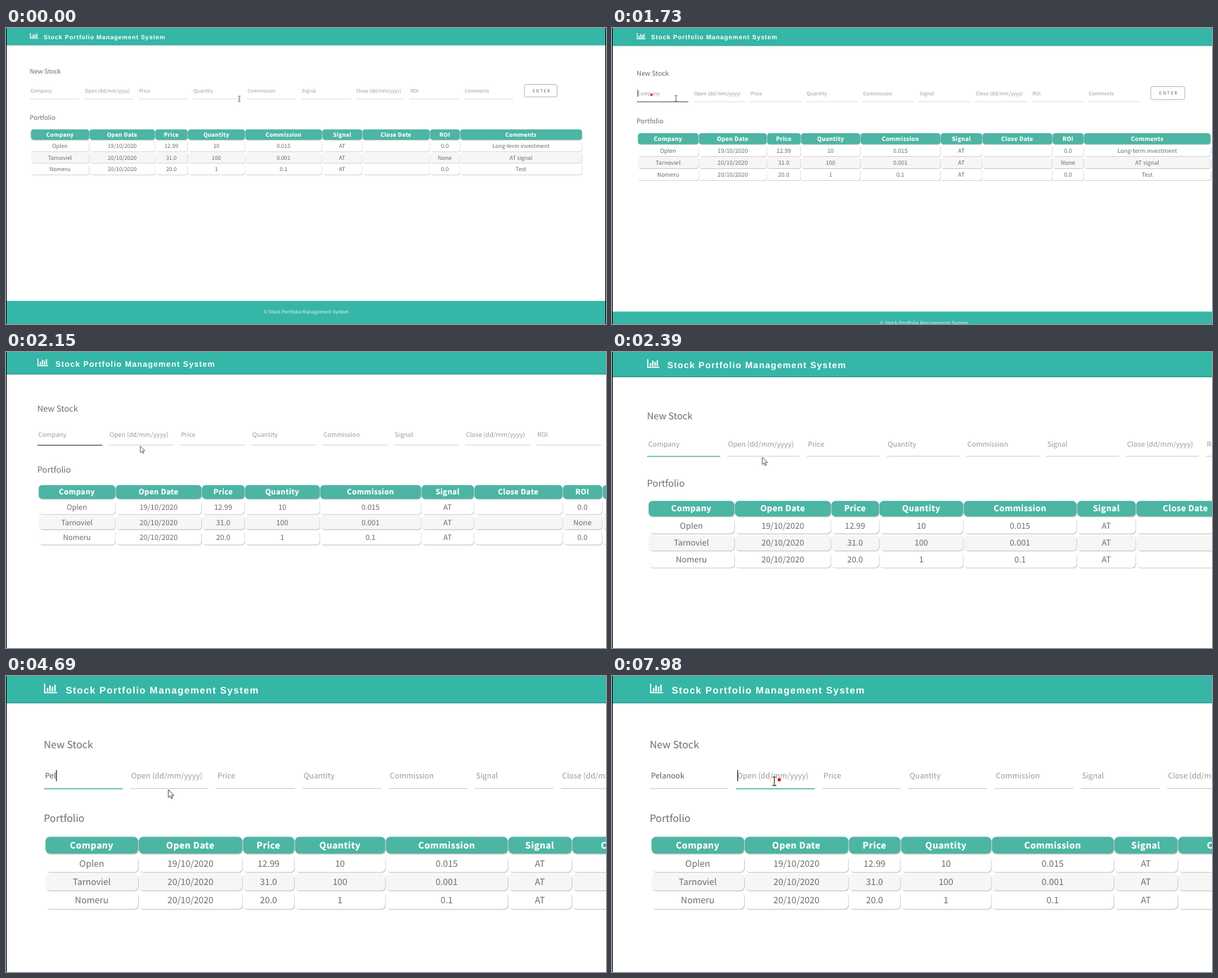
An HTML page for the animation above (8 s loop, 854 by 422 pixels).

```html
<!DOCTYPE html>
<html lang="en">
<head>
<meta charset="utf-8">
<title>Stock Portfolio Management System</title>
<style>
  html, body { margin: 0; width: 100%; height: 100%; overflow: hidden; background: #fff; }
  svg { display: block; width: 854px; height: 422px; }
  text { font-family: "Noto Sans CJK JP", "Noto Sans CJK SC", "Noto Sans", sans-serif;
         font-weight: 300; text-rendering: geometricPrecision; white-space: pre; }
  .brand { font: 700 8.6px "Liberation Sans", Arial, sans-serif; letter-spacing: .74px; fill: #fff; }
  .label { font-size: 9px; fill: #6c6c6c; }
  .hint { font-size: 6.8px; fill: #9a9a9a; }
  .typed { font-size: 6.8px; fill: #5c5c5c; }
  .head { font-size: 7.9px; font-weight: 700; letter-spacing: .31px; fill: #fff; text-anchor: middle;
          stroke: #fff; stroke-width: .15px; }
  .cell { font-size: 7.9px; fill: #6c6c6c; text-anchor: middle; }
  .button { font-size: 6.4px; letter-spacing: 1.2px; fill: #707070; text-anchor: middle; }
  .foot { font-size: 6.8px; fill: #e4f5f2; text-anchor: middle; }
</style>
</head>
<body>
<svg id="stage" viewBox="0 0 854 422" xmlns="http://www.w3.org/2000/svg">
  <g id="page"></g>
  <rect width="1" height="422" fill="#000"/>
</svg>
<script>
const LOOP = 8000;
const page = document.getElementById('page');

function add(tag, attrs, text) {
  const el = document.createElementNS('http://www.w3.org/2000/svg', tag);
  for (const k in attrs) el.setAttribute(k, attrs[k]);
  if (text !== undefined) el.textContent = text;
  page.appendChild(el);
  return el;
}
const box = (x, y, width, height, fill, rx = 0) => add('rect', { x, y, width, height, fill, rx });
const write = (cls, x, y, text) => add('text', { class: cls, x, y }, text);
const show = (el, on) => el.setAttribute('visibility', on ? 'visible' : 'hidden');

// Header and footer
const TEAL = '#35b6a6', GREY = '#cfcfcf', GREEN = '#5bba96';
box(0, 0, 854, 24.4, TEAL);
box(0, 23.8, 854, .6, '#2b8f83');
add('path', { d: 'M34.6 7V14.8H45.8', fill: 'none', stroke: '#fff', 'stroke-width': 1.1 });
[3, 5.4, 4.2, 6].forEach((h, i) => box(36.6 + i * 2.2, 13.8 - h, 1.3, h, '#fff'));
write('brand', 53.5, 15.8, 'Stock Portfolio Management System');
box(0, 389.1, 854, 33, TEAL);
write('foot', 427, 407.2, '© Stock Portfolio Management System');
box(853, 0, 1, 422, '#000');

// Form
write('label', 33.8, 65, 'New Stock');
write('label', 33.8, 130.8, 'Portfolio');
const fields = ['Company', 'Open (dd/mm/yyyy)', 'Price', 'Quantity', 'Commission',
  'Signal', 'Close (dd/mm/yyyy)', 'ROI', 'Comments'].map((name, i) => {
  const x = 34 + i * 77.25;
  return { x, hint: write('hint', x + 1, 92, name), line: box(x, 100.7, 70.5, .7, GREY) };
});
add('rect', { x: 738, y: 80.4, width: 46.4, height: 17.8, rx: 2.2, fill: '#fff', stroke: '#aaa', 'stroke-width': .8 });
write('button', 762.4, 91.8, 'ENTER');

// Table
const widths = [83.6, 93.4, 46.6, 81.5, 109.8, 57.2, 96, 43, 173.8];
const rows = [
  ['Company', 'Open Date', 'Price', 'Quantity', 'Commission', 'Signal', 'Close Date', 'ROI', 'Comments'],
  ['Oplen', '19/10/2020', '12.99', '10', '0.015', 'AT', '', '0.0', 'Long-term investment'],
  ['Tarnoviel', '20/10/2020', '31.0', '100', '0.001', 'AT', '', 'None', 'AT signal'],
  ['Nomeru', '20/10/2020', '20.0', '1', '0.1', 'AT', '', '0.0', 'Test']
];
rows.forEach((row, r) => {
  const y = 144.4 + r * 16.55;
  const fill = r === 0 ? '#4cb5a3' : r % 2 ? '#fff' : '#f6f6f6';
  let x = 35.4;
  row.forEach((text, c) => {
    const w = widths[c] - .6;
    box(x + .6, y + .8, w, 15, '#cbcbcb', 3.8);
    box(x, y, w, 15, fill, 3.8);
    write(r ? 'cell' : 'head', x + w / 2 - .1, y + 10.3, text);
    x += widths[c];
  });
});

// Typed text, caret, click dot, pointer
const typed = write('typed', 35, 92, '');
const caret = box(0, 84.5, .75, 9.9, '#222');
const dot = add('circle', { r: 1.55, fill: '#e01818' });
const beam = add('path', {
  d: 'M-1.8 -3.8H-.5L0 -3.4L.5 -3.8H1.8M0 -3.4V3.4M-1.8 3.8H-.5L0 3.4L.5 3.8H1.8',
  fill: 'none', stroke: '#333', 'stroke-width': .7
});
const arrow = add('path', {
  d: 'M0 0V7L1.6 5.5L2.7 8L3.9 7.5L2.8 5.1H5Z',
  fill: '#fff', stroke: '#333', 'stroke-width': .55, 'stroke-linejoin': 'round'
});

const WORD = 'Pelanook', BLINK = 530, DOT_DELAY = 250;
const FOCUS = [1480, 7640];
// Two bursts of four letters
const keyTime = i => i < 4 ? 4430 + i * 107 : 5680 + (i - 4) * 173;
const resets = [...FOCUS, ...[...WORD].map((_, i) => keyTime(i))];

const clamp = v => Math.max(0, Math.min(1, v));
const mix = (a, b, k) => a + (b - a) * k;

const stops = [[332, 101], [50, 93], [145.5, 102.1], [145.5, 94.5]];
const legs = [
  { start: 230, end: 1460, dip: 26 },
  { start: 1610, end: 1915, dip: 0 },
  { start: 7400, end: 7610, dip: 0 }
];

function pointer(t) {
  const i = Math.max(0, legs.filter(leg => t >= leg.start).length - 1);
  const { start, end, dip } = legs[i];
  const k = clamp((t - start) / (end - start));
  const [a, b] = [stops[i], stops[i + 1]];
  return [mix(a[0], b[0], k), mix(a[1], b[1], k) + dip * Math.sin(Math.PI * k)];
}

function underline(field, color) {
  field.line.setAttribute('fill', color);
  field.line.setAttribute('height', color === GREY ? .7 : 1);
}

function draw(t) {
  const q = Math.floor((t - 20) / 30) * 30 + 20;
  page.setAttribute('transform', `scale(${mix(1, 1.588, clamp((q - 1670) / 900))})`);

  const [x, y] = pointer(q);
  const inField = y < 102;
  [beam, arrow].forEach(el => el.setAttribute('transform', `translate(${x} ${y})`));
  show(beam, inField);
  show(arrow, !inField);

  const text = [...WORD].filter((_, i) => t >= keyTime(i)).join('');
  if (typed.textContent !== text) typed.textContent = text;
  show(fields[0].hint, !text);

  const second = t >= FOCUS[1];
  const since = t - Math.max(...resets.filter(at => at <= t));
  caret.setAttribute('x', second ? fields[1].x + 1 : 35 + (text ? typed.getComputedTextLength() : 0));
  show(caret, t >= FOCUS[0] && Math.floor(since / BLINK) % 2 === 0);

  underline(fields[0], t < FOCUS[0] || second ? GREY : t < 2270 ? '#555' : GREEN);
  underline(fields[1], second ? GREEN : GREY);

  dot.setAttribute('cx', second ? 149.9 : 54);
  dot.setAttribute('cy', second ? 93.2 : 91.6);
  const shown = t - FOCUS[+second] - DOT_DELAY;
  show(dot, shown >= (second ? 90 : 0) && shown < 120);
}

function tick() {
  draw(performance.now() % LOOP);
  requestAnimationFrame(tick);
}
tick();
</script>
</body>
</html>
```
